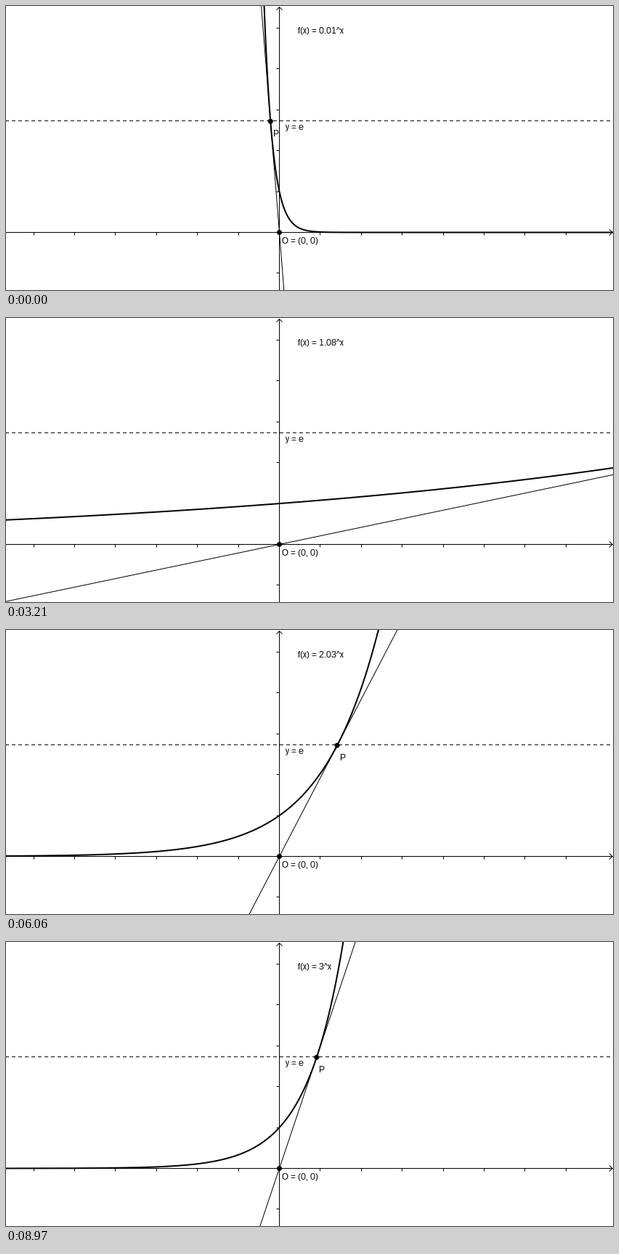
Recreate the animation shown at these times as a matplotlib script. Size 836 by 392 pixels, loop 9000 ms.

```python
import numpy as np
import matplotlib.pyplot as plt
from matplotlib.animation import FuncAnimation

W, H, DPI = 836, 392, 64
PX = 72 / DPI                      # points per pixel
OX, OY, UNIT = 376.5, 312.5, 56.4  # origin and scale in pixels
FRAMES, STEP = 300, 30

# whole-pixel glyph advances
plt.rcParams.update({"font.family": "Liberation Sans",
                     "text.hinting": "native",
                     "text.hinting_factor": 1})
fig = plt.figure(figsize=(W / DPI, H / DPI), dpi=DPI, facecolor="white")
ax = fig.add_axes([0, 0, 1, 1])
ax.set(xlim=(0, W), ylim=(H, 0))
ax.axis("off")


def line(xs, ys, width=1, **kw):
    return ax.plot(xs, ys, color="black", lw=width * PX, snap=False,
                   solid_capstyle="butt", dash_capstyle="butt", **kw)[0]


def label(x, y, text):
    return ax.text(x, y, text, fontsize=12 * PX, color="black",
                   ha="left", va="baseline", zorder=5)


def dot(x, y):
    return ax.add_patch(plt.Circle((x, y), 3.5, color="black", lw=0,
                                   snap=False, zorder=4))


def draw_axes():
    line([0, W], [OY, OY])
    line([OX, OX], [1, H])
    line([W - 5, W - 1, W - 5], [OY - 4, OY, OY + 4])
    line([OX - 4, OX, OX + 4], [5.5, 1.5, 5.5])
    for k in range(-6, 8):
        if k:
            x = np.floor(OX + k * UNIT) + 0.5
            line([x, x], [OY, OY + 4])
    for k in range(-1, 6):
        if k:
            y = np.floor(OY - k * UNIT) + 0.5
            line([OX - 4, OX], [y, y])


draw_axes()
line([-4, W], [158.5, 158.5], linestyle=(0, (5, 4)))
label(385, 171, "y = e")
label(380, 328, "O = (0, 0)")
dot(OX, OY)

px = np.linspace(-2, W + 2, 1681)
xs = (px - OX) / UNIT
ends = np.array([-2.0, W + 2.0])

curve = line(px, px * 0, 2, solid_joinstyle="round", zorder=3)
tangent = line(ends, ends * 0)
point = dot(0, 0)
name = label(0, 180, "P")
formula = label(402, 38, "")


def update(i):
    a = (i + 1) / 100
    k = np.log(a)
    formula.set_text(f"f(x) = {a:g}^x")
    curve.set_ydata(OY - UNIT * np.exp(np.minimum(k * xs, 2.2)))

    # the tangent through the origin touches the curve at (1 / ln a, e)
    finite = a != 1
    x = OX + UNIT / k if finite else -W
    tangent.set_ydata(OY - np.e * k * (ends - OX))
    tangent.set_visible(finite)
    shown = -20 < x < W + 20
    point.set_center((x, OY - np.e * UNIT))
    name.set_position((np.floor(x) + 3, 180))
    point.set_visible(shown)
    name.set_visible(shown)
    return curve, tangent, point, name, formula


anim = FuncAnimation(fig, update, frames=FRAMES, interval=STEP,
                     repeat=True, repeat_delay=0, blit=False)
plt.show()
```
